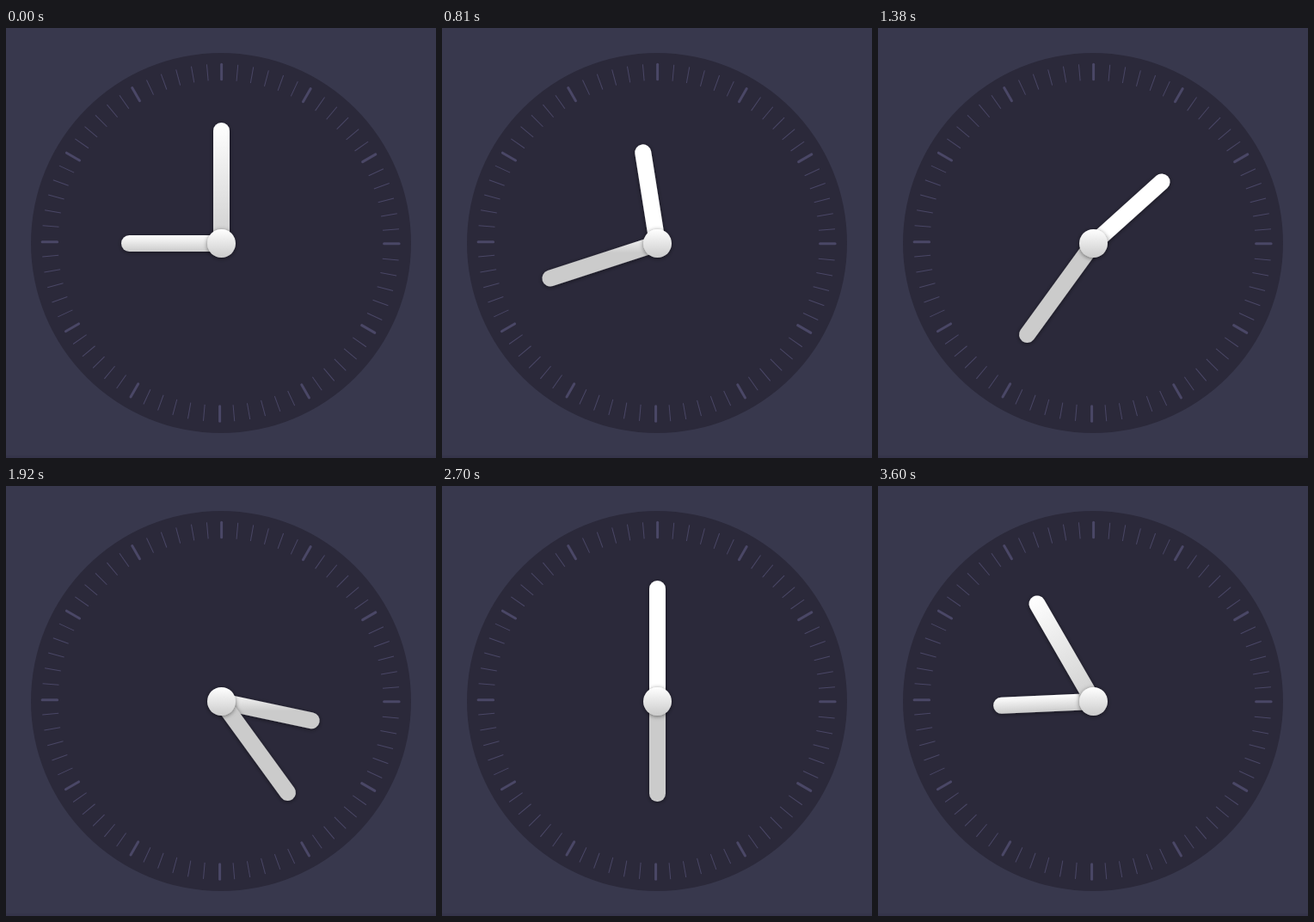
An HTML page that plays this animation: 500 px wide and 500 px high, repeating every 3.63 s.

```html
<!DOCTYPE html>
<html lang="en">
<head>
<meta charset="utf-8">
<title>Clock</title>
<style>
  html, body { margin: 0; width: 100%; height: 100%; overflow: hidden; background: #38384d; }
  svg { display: block; width: 100vw; height: 100vh; }
</style>
</head>
<body>
<svg viewBox="0 0 500 500">
  <defs>
    <linearGradient id="hubFill" x1="0" y1="0" x2="0" y2="1">
      <stop offset="0" stop-color="#fff"/><stop offset="1" stop-color="#cbcbcb"/>
    </linearGradient>
    <linearGradient id="minuteFill" gradientUnits="userSpaceOnUse">
      <stop offset="0" stop-color="#fff"/><stop offset="1" stop-color="#cbcbcb"/>
    </linearGradient>
    <linearGradient id="hourFill" gradientUnits="userSpaceOnUse">
      <stop offset="0" stop-color="#fff"/><stop offset="1" stop-color="#cbcbcb"/>
    </linearGradient>
    <filter id="shadow" filterUnits="userSpaceOnUse" x="0" y="0" width="500" height="500">
      <feDropShadow dx="0" dy="1" stdDeviation="2.5" flood-color="#000" flood-opacity=".5"/>
    </filter>
  </defs>
  <rect width="500" height="500" fill="#38384d"/>
  <rect y="497" width="500" height="3" fill="#35344a"/>
  <circle cx="250" cy="250" r="221" fill="#2b293a"/>
  <g id="ticks" stroke="#4a4766" transform="translate(249.6 249.8)"></g>
  <g filter="url(#shadow)"><path id="hour" fill="url(#hourFill)"/></g>
  <g filter="url(#shadow)"><path id="minute" fill="url(#minuteFill)"/></g>
  <circle cx="250.5" cy="250.5" r="16.5" fill="url(#hubFill)" filter="url(#shadow)"/>
</svg>
<script>
const NS = 'http://www.w3.org/2000/svg';
const STEP = 30, STEPS = 121, SLOW = 115;
const C = 250.5, R = 9.5;
const $ = id => document.getElementById(id);

function set(el, attrs) {
  for (const k in attrs) el.setAttribute(k, attrs[k]);
  return el;
}

for (let a = 0; a < 360; a += 5) {
  const major = a % 30 === 0;
  const x = major ? 1 : 2;
  $('ticks').append(set(document.createElementNS(NS, 'line'), {
    x1: x, x2: x,
    y1: major ? -207.5 : -208, y2: major ? -190 : -189,
    'stroke-width': major ? 3 : 1,
    'stroke-linecap': major ? 'round' : 'butt',
    transform: `rotate(${a})`
  }));
}

// Both hands point up at zero rotation and differ only in length.
function shape(id, len) {
  set($(id), {
    d: `M${C - R} ${C}V${C - len}a${R} ${R} 0 0 1 ${2 * R} 0V${C}a${R} ${R} 0 0 1 ${-2 * R} 0z`
  });
}
shape('minute', 131);
shape('hour', 107);

// The light runs from white to grey between two points of the stage.
function light(id, angle, from, to) {
  const a = -angle * Math.PI / 180;
  const turn = (x, y) => [
    C + (x - C) * Math.cos(a) - (y - C) * Math.sin(a),
    C + (x - C) * Math.sin(a) + (y - C) * Math.cos(a)
  ];
  const [x1, y1] = turn(C, from), [x2, y2] = turn(C, to);
  set($(id + 'Fill'), { x1, y1, x2, y2 });
}

function pose(id, angle, lightAngle, from, to) {
  set($(id), { transform: `rotate(${angle} ${C} ${C})` });
  light(id, lightAngle, from, to);
}

function draw(ms) {
  const n = Math.floor(ms / STEP) % STEPS;
  const turned = n <= SLOW ? 3 * n : 3 * SLOW + 2.5 * (n - SLOW);
  const hour = 270 + turned, minute = 12 * turned;
  if (n === 0 || n > SLOW) {
    // Near the hour the shading belongs to the hands and turns with them.
    pose('minute', minute, 0, C - 140.5, C + R);
    pose('hour', hour, 270, C - R, C + R);
  } else {
    pose('minute', minute, minute, C - 11, C + 11);
    pose('hour', hour, hour, C - 11, C + 11);
  }
}

let start;
function tick(now) {
  if (start === undefined) start = now;
  draw(now - start);
  requestAnimationFrame(tick);
}
draw(0);
requestAnimationFrame(tick);
</script>
</body>
</html>
```
